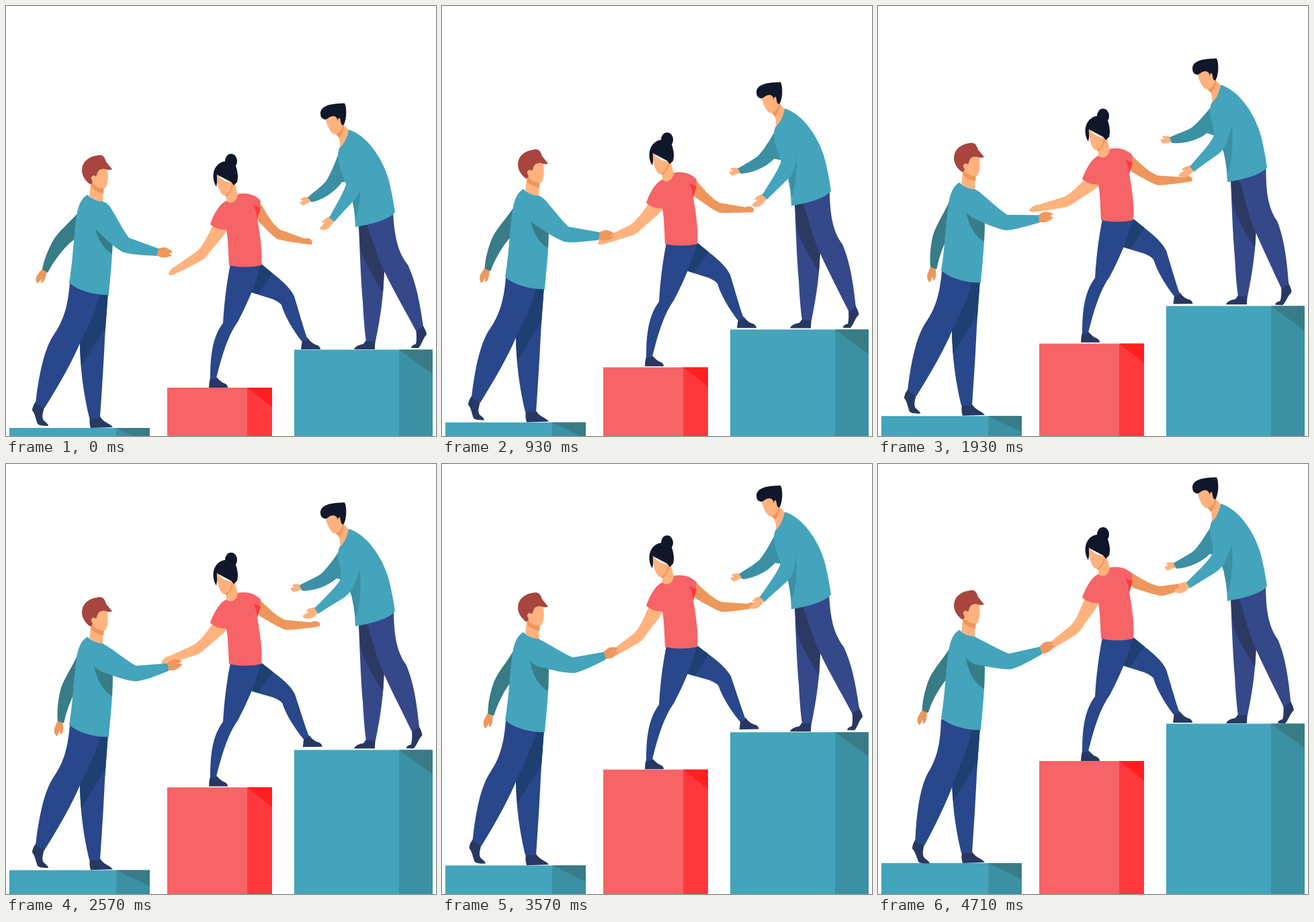
An HTML page that plays this animation: 640x640 px, repeating every 4.78 s.

```html
<!DOCTYPE html>
<html lang="en">
<head>
<meta charset="utf-8">
<title>Climbing together</title>
<style>
html, body { margin: 0; width: 100%; height: 100%; overflow: hidden; background: #fff; }
svg { display: block; width: 100vw; height: 100vh; }
.teal { fill: #44a4bc } .teal2 { fill: #3c90a4 } .teal3 { fill: #387c88 }
.red { fill: #f66467 } .red2 { fill: #ff383d } .red3 { fill: #ff1f20 }
.navy { fill: #29478b } .navy2 { fill: #1e3f72 }
.indigo { fill: #35488a } .indigo2 { fill: #2c3a63 }
.shoe { fill: #273862 } .skin { fill: #ffb27d } .skin2 { fill: #ed975d }
.auburn { fill: #a9453f } .black { fill: #10172a }
</style>
</head>
<body>
<svg viewBox="0 0 640 640">
  <g class="block" data-rise="34">
    <path class="teal" d="M5,628H164V940H5Z"/>
    <path class="teal2" d="M164,628H214V940H164Z"/>
    <path class="teal3" d="M164,628H214V652Z"/>
  </g>
  <g class="block" data-rise="126">
    <path class="red" d="M240,568H359V940H240Z"/>
    <path class="red2" d="M359,568H396V940H359Z"/>
    <path class="red3" d="M359,568H396V597Z"/>
  </g>
  <g class="block" data-rise="125">
    <path class="teal" d="M429,511.5H585V940H429Z"/>
    <path class="teal2" d="M585,511.5H635V940H585Z"/>
    <path class="teal3" d="M585,511.5H635V548Z"/>
  </g>

  <g data-rise="34">
    <g id="leftBackArm">
      <path class="skin2" d="M54,391L46,401C44,406 44,411 47,413L53,406L52,412L55,411C59,407 59,402 61,395Z"/>
      <path class="teal3" d="M112,302L106,309C94,323 77,336 69,351C61,366 56,380 54,392L62,397C71,380 85,360 101,348L125,335Z"/>
    </g>
    <path class="shoe" d="M125,611H140C145,620 155,621 159,627L126,628C124,622 124,617 125,611Z"/>
    <path class="navy" d="M120,425L110,500C110,540 116,580 124,613L140,613C143,570 146,520 147,495L152,425Z"/>
    <path class="navy2" d="M138,425H152L148,478L112,536Q110,515 110,500Q125,465 138,425Z"/>
    <g id="leftLeg">
      <path class="shoe" d="M45,588C40,594 39,600 39,602C43,606 44,614 47,622Q49,625 63,625C63,621 57,619 55,615C53,609 56,603 57,596Z"/>
      <path class="navy" d="M95,412C92,450 84,470 72,488C56,510 48,555 44,591L57,599C75,570 96,535 111,500C125,470 136,450 141,425Z"/>
    </g>
    <path class="teal" d="M121,281C112,286 108,297 106,307C100,340 101,370 94,412C108,424 130,430 153,430C155,405 159,375 159,330L158,305C150,295 146,292 143,290Q130,290 121,281Z"/>
    <path class="teal3" d="M131,322C134,345 145,362 158,369L159,330Z"/>
    <path class="skin" d="M126,266L145,270L144,291Q133,291 124,283Z"/>
    <path class="skin2" d="M127,262L146,270L145,279Q135,278 127,270Z"/>
    <path class="skin" d="M128,248L150,238C152,250 153,262 148,271C140,273 132,268 127,262Z"/>
    <path class="auburn" d="M113,245C113,232 122,224 138,222C144,221 147,225 149,232L158,243C151,246 146,240 142,243C136,244 136,250 134,254C131,251 127,252 127,257L129,262L126,266C118,261 113,252 113,245Z"/>
  </g>

  <g data-rise="126">
    <path id="womanRightArm" class="skin2" d="M365,285L377,291C386,305 396,325 408,333L444,346Q453,344 456,351L455,355Q449,355 444,354C430,352 415,350 404,347C395,341 385,330 372,317Z"/>
    <path id="womanLeftArm" class="skin" d="M312,318C304,333 298,349 289,360Q286,364 280,368L253,387Q243,391 242,400Q246,402 253,398L264,393L287,381Q297,376 302,368C312,355 322,345 329,333L326,315Z"/>
    <g id="womanLeg">
      <path class="shoe" d="M441,496L449,494Q455,503 464,505Q468,508 468,511H439Q440,504 441,496Z"/>
      <path class="navy" d="M376,382C394,396 421,414 429,432C436,455 442,477 449,497L440,499C427,482 415,462 410,445Q406,440 396,436L364,426Z"/>
      <path class="navy2" d="M379,383L397,398Q385,413 375,429L364,425Q372,405 374,386Z"/>
    </g>
    <path class="shoe" d="M304,553H314Q320,560 326,562Q330,564 330,568H302Q302,560 304,553Z"/>
    <path class="navy" d="M334,384H379C375,405 362,438 345,470C330,490 320,525 313,554L304,556C304,530 305,495 323,472C325,440 328,415 334,384Z"/>
    <path class="red" d="M328,290C318,294 309,310 304,325Q315,334 328,333C331,350 331,370 332,386Q356,391 380,386C382,365 378,340 374,317C377,308 378,300 379,290C372,282 360,277 345,280Q340,292 328,290Z"/>
    <path class="red2" d="M368,296L379,300L374,317Q373,305 368,296Z"/>
    <path class="skin" d="M328,280L340,262L345,281Q343,292 334,293Q328,292 328,288Z"/>
    <path class="skin2" d="M325,281L336,264L338,268Q336,277 328,284Z"/>
    <ellipse class="black" cx="335" cy="231" rx="9" ry="11"/>
    <path class="black" d="M313,269C306,258 307,241 318,234C325,229 338,230 342,238C345,247 346,255 344,262L339,267L335,262L316,252Z"/>
    <path class="skin" d="M314,250C313,262 317,278 324,282C331,281 336,272 336,263Q322,262 314,250Z"/>
  </g>

  <g data-rise="125">
    <g id="rightBackArm">
      <path class="skin" d="M450,284Q440,284 438,288L442,290L437,292Q438,296 443,297L449,293L455,291Z"/>
      <path class="teal2" d="M494,222C488,238 482,252 476,261C468,270 460,275 449,285L455,292C470,289 490,277 500,262H515V240Z"/>
    </g>
    <path class="shoe" d="M537,496H550Q549,505 549,511H518Q520,505 532,503Z"/>
    <path class="indigo" d="M525,325C527,380 529,420 531,440Q533,480 536,499H550C558,460 562,430 563,393L545,325Z"/>
    <path class="indigo2" d="M525,325H537L563,393L561,427Q540,395 528,365Z"/>
    <g id="rightLeg">
      <path class="shoe" d="M610,480L619,473Q626,484 626,489C620,495 619,504 614,509H603Q603,505 610,503Q612,495 610,480Z"/>
      <path class="indigo" d="M536,322L576,306C578,340 582,365 598,385C612,415 617,450 621,476L611,485C595,455 575,420 563,395C553,375 545,345 536,322Z"/>
    </g>
    <path class="teal" d="M510,184C537,192 561,227 570,260C576,285 578,300 579,307C568,320 540,325 520,329Q519,305 515,285C505,262 494,240 494,220Q496,208 500,207Q506,200 510,184Z"/>
    <path class="teal2" d="M527,246C529,275 526,300 521,315L513,278Z"/>
    <path class="skin" d="M490,190L503,177L510,185Q506,203 497,211Q498,200 494,194Z"/>
    <path class="skin2" d="M491,191L502,176L503,182Q500,192 496,196Z"/>
    <path class="skin" d="M475,167Q480,186 488,191Q497,190 501,180L495,160Z"/>
    <path class="black" d="M468,160C468,150 480,145 502,145L503,144L505,147C507,155 507,165 504,174L502,178L499,176L497,167Q494,166 494,171Q492,163 486,164C480,165 480,168 475,169Q468,168 468,160Z"/>
    <g id="rightFrontArm">
      <path class="skin" d="M482,313Q472,317 470,322L474,323L468,329Q466,332 470,333Q478,334 482,329L489,320Z"/>
      <path class="teal" d="M497,232C503,250 508,260 506,266C502,278 495,290 481,315L489,321C500,308 512,296 519,288C524,282 527,275 528,268L530,235L515,215Z"/>
    </g>
  </g>

  <g data-rise="34">
    <g id="leftFrontArm">
      <path class="skin2" d="M225,361L236,359C240,360 247,364 248,367L242,368L247,371C243,374 235,375 231,374L223,371Z"/>
      <path class="teal" d="M147,292C151,294 155,298 158,304C166,317 174,333 183,345L227,361L224,372C205,371 185,370 173,366C155,355 145,343 134,333C120,320 125,300 147,292Z"/>
    </g>
  </g>
</svg>
<script>
const LOOP = 4780, RISE_TIME = 4740;

// Each limb swings about its pivot, easing from one angle to the next on every beat (ms)
const limbs = {
  leftBackArm:   { pivot: [118, 317], beat: 2100, angles: [0, -17, -8.5] },
  leftLeg:       { pivot: [115, 430], beat: 1600, angles: [0, 0, 0, -4] },
  womanLeftArm:  { pivot: [321, 332], beat: 1800, angles: [0, 18.5, -2, -4] },
  womanRightArm: { pivot: [364, 296], beat: 1600, angles: [0, -16, -14.5, -28] },
  womanLeg:      { pivot: [375, 390], beat: 1600, angles: [0, 0, -2, 0] },
  rightBackArm:  { pivot: [514, 226], beat: 1800, angles: [0, 18, 7, 11.5] },
  rightFrontArm: { pivot: [517, 228], beat: 1200, angles: [0, 3.5, 16, 5.5, 16] },
  rightLeg:      { pivot: [560, 330], beat: 1800, angles: [0, 3.8, 0, 3.8] }
};

function swing({ beat, angles }, t) {
  const step = Math.floor(t / beat), from = angles[step] ?? angles.at(-1);
  const to = angles[step + 1] ?? from;
  return from + (to - from) * (1 - Math.cos(Math.PI * (t / beat - step))) / 2;
}

// From 0 to 1, starting at the given speed and coming to rest
const climb = (u, speed) => u * u * (3 - 2 * u) + speed * u * (1 - u) ** 2;

function rotate(id, angle, [x, y]) {
  document.getElementById(id).setAttribute('transform', `rotate(${angle} ${x} ${y})`);
}

const risers = document.querySelectorAll('[data-rise]');
const start = performance.now();

function draw() {
  const t = (performance.now() - start) % LOOP;
  const u = Math.min(t / RISE_TIME, 1);
  for (const g of risers) {
    const speed = g.classList.contains('block') ? 1.1 : 1.2;
    g.setAttribute('transform', `translate(0 ${-g.dataset.rise * climb(u, speed)})`);
  }
  for (const [id, limb] of Object.entries(limbs)) rotate(id, swing(limb, t), limb.pivot);
  rotate('leftFrontArm', -32.6 * Math.sin(Math.PI / 2 * t / LOOP), [140, 310]);
  requestAnimationFrame(draw);
}
draw();
</script>
</body>
</html>
```
